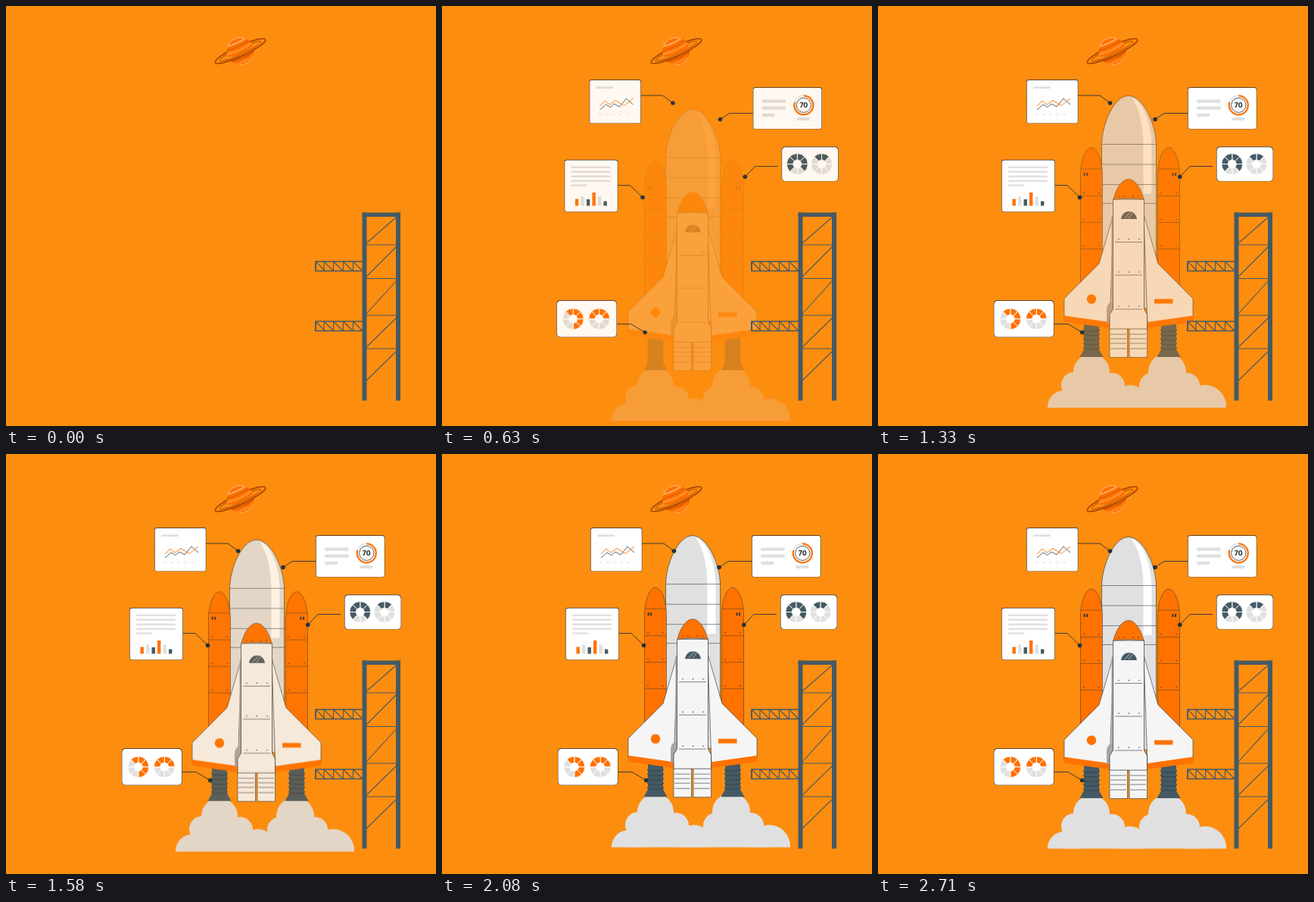
These frames come from a looping animation (568 px wide and 554 px high, 2.75 s). An HTML page:

```html
<!DOCTYPE html>
<html lang="en">
<head>
<meta charset="utf-8">
<title>Shuttle launch</title>
<style>
  html, body { margin: 0; height: 100%; overflow: hidden; background: #fd8d0f; }
  svg { display: block; width: 568px; height: 554px; }
  text { font: 800 8.6px Inter, sans-serif; text-anchor: middle; }
</style>
</head>
<body>
<svg id="stage" viewBox="0 0 568 554"></svg>
<script>
const SLATE = '#455a64', INK = '#263238', ORANGE = '#ff7200', GREY = '#e0e0e0', PALE = '#f5f5f5';
const LOOP = 2750;

const path = (d, fill = 'none', stroke = 'none', width = .7) =>
  `<path d="${d}" fill="${fill}" stroke="${stroke}" stroke-width="${width}"/>`;
const rect = (x, y, w, h, fill, r = 0) =>
  `<rect x="${x}" y="${y}" width="${w}" height="${h}" rx="${r}" fill="${fill}"/>`;
const circle = (x, y, r, fill) => `<circle cx="${x}" cy="${y}" r="${r}" fill="${fill}"/>`;
const line = (d, stroke = INK, width = .6) => path(d, 'none', stroke, width);
const each = (list, fn) => list.map(fn).join('');

function planet() {
  const bands = each([-14, -9, -4, 2, 7, 12], (y, i) =>
    line(`M-19 ${y}Q0 ${y + 5} 19 ${y}`, ['#ffab5e', '#d95700', '#ff9a3d'][i % 3], i % 2 ? 1.2 : 2));
  const ring = sweep =>
    line(`M-36.5 0A36.5 6.6 0 0 ${sweep} 36.5 0`, '#b04a00', 2) +
    line(`M-30 0A30 4 0 0 ${sweep} 30 0`, '#c65500', 1.1);
  return `<clipPath id="disc"><circle r="18"/></clipPath>
    <g transform="translate(309.5 59.5) rotate(-24.5)">${ring(1)}
    <g clip-path="url(#disc)">${circle(0, 0, 18, ORANGE)}${bands}</g>
    ${line('M-13 -12.4A18 18 0 0 1 12 -13.4', '#ffd0a0', .7)}
    ${line('M-9 15.5A18 18 0 0 0 9 15.5', '#ffd0a0', .6)}${ring(0)}</g>`;
}

function tower() {
  const arm = y => line(`M471 ${y}H409V${y + 12.5}H471`, SLATE, 1.7) +
    each([409, 420, 432.5, 445.5, 458.5], x => line(`M${x} ${y}V${y + 12.5}M${x} ${y}l12.5 12.5`, SLATE, 1.1));
  return rect(470.5, 272.5, 6, 248, SLATE) + rect(515, 272.5, 6, 248, SLATE) +
    rect(470.5, 272.5, 50.5, 5.5, SLATE) +
    each([315, 359.5, 408, 452], y => line(`M476 ${y}H516`, SLATE, 1)) +
    each([[313, 278], [357, 317], [406, 362], [450, 411], [494, 455]],
      ([a, b]) => line(`M476 ${a}L516 ${b}`, SLATE, 1.1)) +
    arm(337) + arm(416);
}

function booster(x, marks) {
  const body = `M${x - 14.5} 400V214C${x - 14.5} 196 ${x - 8} 178 ${x} 178S${x + 14.5} 196 ${x + 14.5} 214V400Z`;
  const engine = `M${x - 10} 410H${x + 10}V444L${x + 15.5} 454H${x - 15.5}L${x - 10} 444Z`;
  return path(engine, SLATE) +
    each([418, 424, 430, 436, 442], y => line(`M${x - 11} ${y}H${x + 11}`, SLATE, 2) +
      line(`M${x - 10} ${y + 1.8}H${x + 10}`, INK, .6)) +
    path(body, ORANGE, INK, .5) +
    each([206, 241.5, 276.5, 311.5], y => line(`M${x - 14} ${y}H${x + 14}`, INK, .45) +
      (y > 206 ? each([-10, 10], dx => circle(x + dx, y - 4, .7, INK)) : '')) +
    rect(marks, 211, 1.9, 4, INK) + rect(marks + 3.6, 211, 1.9, 4, INK);
}

function tank() {
  return path('M295.5 390V174C296 146 312 109.5 331 109.5S367 146 367.5 174V390Z', GREY, INK, .6) +
    path('M335 112C352 117 361 150 361.5 172V239H350.5V174C350 150 346 127 335 112Z', '#fff') +
    each([173.5, 200, 226.5, 251.5], y => line(`M296 ${y}H367.5`, INK, .55));
}

function wing(side) {
  const x = d => 331 + side * d;
  return path(`M${x(20)} 266L${x(39)} 331L${x(85)} 377V403L${x(25)} 411Z`, PALE, INK, .6) +
    path(`M${x(85)} 399.5L${x(25)} 408V416L${x(85)} 407.5Z`, ORANGE);
}

function orbiter() {
  const rivets = (y, list) => each(list, x => circle(x, y, .75, INK));
  const nozzle = x => path(`M${x} 416h23.5v38.5h-23.5Z`, PALE, INK, .6) +
    each([424, 430, 436, 443], y => line(`M${x + 1} ${y}h21`, INK, .6));
  return wing(-1) + wing(1) +
    path('M302 409V392Q302 382 311 381V409Z', '#a6a6a6') +
    line('M309.3 268V384', '#a6a6a6', 1.8) +
    circle(282, 377.6, 6.3, ORANGE) + rect(365, 377.5, 24.5, 6, ORANGE) +
    nozzle(306) + nozzle(332) +
    path('M310.5 246H351.5V391L355.5 398V417H306V398L310.5 391Z', PALE, INK, .7) +
    path('M311 246C314 233 322 219.5 331 219.5S348 233 351 246Q331 243.5 311 246Z', ORANGE, INK, .5) +
    rivets(242, [318, 325, 337, 344]) +
    path('M321 272C322 265 327 262 331.5 262S341 265 342 272Z', SLATE) +
    line('M326 271L333 263M331 271L336 264.5', '#8a989f', 1.3) +
    each([302.5, 346, 391], y => line(`M313 ${y}H349`, INK, .6) + rivets(y - 4, [318, 331.5, 345]));
}

function smoke() {
  const puffs = [[282, 474, 24], [259, 491, 17], [309, 492, 17], [246, 520, 22], [333, 513, 22],
    [382, 474, 25], [362, 492, 17], [408, 492, 17], [432, 519, 28]];
  return `<clipPath id="ground"><rect x="220" y="440" width="245" height="80.5"/></clipPath>
    <g clip-path="url(#ground)">${each(puffs, p => circle(...p, GREY))}${rect(246, 496, 186, 30, GREY)}</g>`;
}

function card(x, y, w, h, r, pointer, [dotX, dotY], content) {
  return line(`M${pointer}L${dotX} ${dotY}`, INK, .9) + circle(dotX, dotY, 2.8, INK) +
    rect(x - .5, y - .8, w + 1, h + 1, INK, r) + rect(x, y, w, h, '#fff', r) + content;
}

// Eight-slice donut; slices [from, to) counted clockwise from the top get the accent colour.
function donut(cx, cy, from, to, accent) {
  const at = (r, i) => {
    const a = i * Math.PI / 4;
    return `${cx + r * Math.sin(a)} ${cy - r * Math.cos(a)}`;
  };
  return each([0, 1, 2, 3, 4, 5, 6, 7], i => path(
    `M${at(14, i)}A14 14 0 0 1 ${at(14, i + 1)}L${at(5.5, i + 1)}A5.5 5.5 0 0 0 ${at(5.5, i)}Z`,
    (i - from + 8) % 8 < to - from ? accent : GREY, '#fff', 1));
}

function leftCards() {
  const chart = rect(205, 106.2, 23, 2.8, GREY, 1.2) +
    each([118, 124, 130, 136], y => rect(201.5, y, 1.5, .7, GREY)) +
    each([208, 217, 226, 235, 244], x => rect(x, 143, 4, 1, GREY)) +
    line('M205 140H256', '#eee', .5) +
    line('M210 137L218 130L224 133.5L229 129L236 133L245 122L254 130', SLATE, .9) +
    line('M210 132L217 125L223 130L231 124.5L242 131.5L254 122', ORANGE, .9);
  const report = each([211.5, 217.5, 223.5, 229.5], y => rect(172, y, 52, 2.5, GREY, 1)) +
    rect(172, 235.3, 21.5, 2.5, GREY, 1) + line('M172 249H224', '#eee', .5) +
    each([9, 12, 8.5, 17.5, 12, 6], (h, i) =>
      rect(177.5 + i * 7.5, 263.5 - h, 4.4, h, [ORANGE, GREY, SLATE][i % 3]));
  return card(196.8, 98, 67, 56.5, 2, '264 118H293', [306.5, 128], chart) +
    card(163.8, 203.6, 69.5, 67.6, 3, '233 236.5H250', [266.5, 252.5], report) +
    card(153.4, 389, 78.6, 47.5, 4.5, '232 419.5H251', [269.7, 430.5],
      donut(174.8, 412.8, -1, 4, ORANGE) + donut(209.2, 412.8, -2, 2, ORANGE));
}

function rightCards() {
  const gauge = rect(421, 123.5, 32, 4.2, GREY, 2) + rect(421, 132.5, 32, 4.2, GREY, 2) +
    rect(421, 141.8, 17.5, 4.2, GREY, 2) + rect(467, 147, 17.5, 4, GREY, 2) +
    `<circle cx="476.3" cy="130.8" r="12.5" fill="none" stroke="${GREY}" stroke-width="1.6"/>` +
    line('M476.3 118.3A12.5 12.5 0 1 1 464.4 127', ORANGE, 2.3) +
    `<circle cx="476.3" cy="130.8" r="9.6" fill="none" stroke="${INK}" stroke-width=".8"/>
     <text x="476.3" y="134" fill="${INK}">70</text>`;
  return card(409.8, 108, 90, 54, 2.5, '409 141.5H378', [366, 149.5], gauge) +
    card(447.6, 186.2, 74, 44.8, 4.5, '442 211.5H412', [398.8, 225.3],
      donut(467.8, 208.5, -3, 3, SLATE) + donut(500, 208.5, -1, 1, SLATE));
}

document.getElementById('stage').innerHTML = planet() +
  `<g id="rocket">${smoke()}${tank()}${booster(282, 271.7)}${booster(384, 388.5)}${orbiter()}</g>` +
  tower() + `<g id="left">${leftCards()}</g><g id="right">${rightCards()}</g>`;

// cubic-bezier(.36, -.01, .5, 1.38)
function ease(x) {
  if (x <= 0 || x >= 1) return x <= 0 ? 0 : 1;
  const bezier = (s, a, b) => 3 * (1 - s) ** 2 * s * a + 3 * (1 - s) * s * s * b + s ** 3;
  let lo = 0, hi = 1;
  for (let i = 0; i < 24; i++) {
    const mid = (lo + hi) / 2;
    if (bezier(mid, .36, .5) < x) lo = mid; else hi = mid;
  }
  return bezier(lo, -.01, 1.38);
}

function pose(id, dx, dy, progress) {
  const el = document.getElementById(id), rest = 1 - progress;
  el.setAttribute('transform', `translate(${dx * rest} ${dy * rest})`);
  el.setAttribute('opacity', Math.min(1, Math.max(0, progress)));
}

function draw(now) {
  const t = now % LOOP, time = t < 130 ? 0 : t;
  const slide = ease(time / 1000);
  pose('left', -30, 0, slide);
  pose('right', 30, 0, slide);
  pose('rocket', 0, 33, ease(time / 2700));
}

const start = performance.now();
function tick() {
  draw(performance.now() - start);
  requestAnimationFrame(tick);
}
tick();
</script>
</body>
</html>
```
